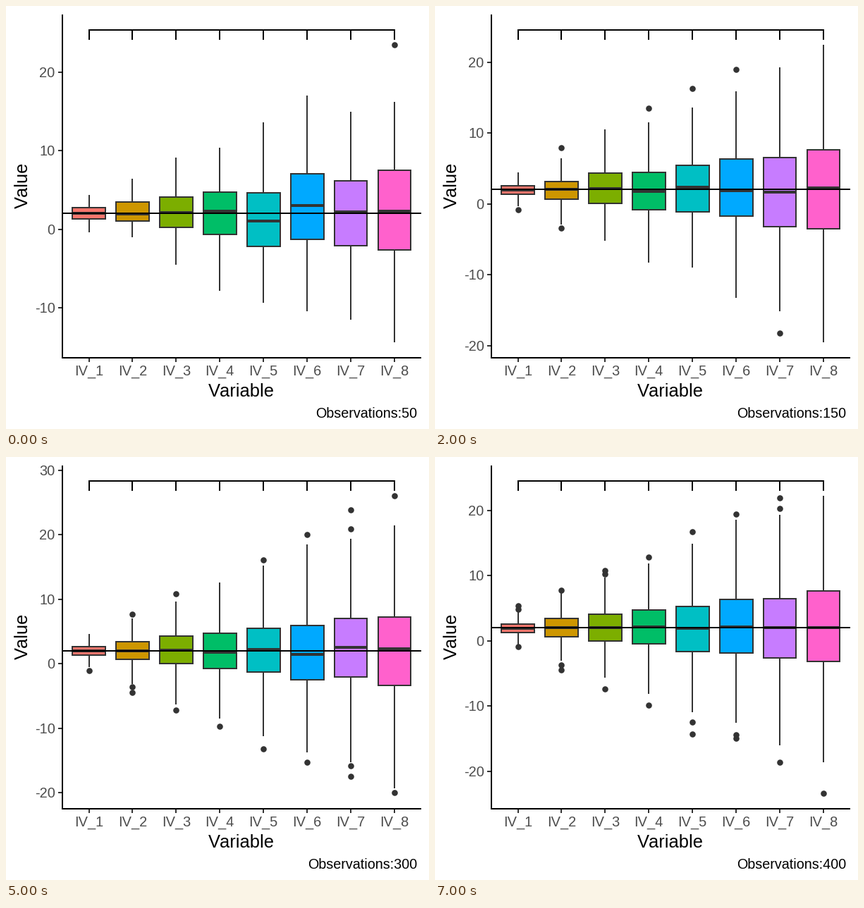
Recreate the animation shown at these times as a matplotlib script. Size 600 by 600 pixels, loop 8000 ms.

```python
import numpy as np
import matplotlib.pyplot as plt
from matplotlib.animation import FuncAnimation
from matplotlib.patches import Rectangle

plt.rcParams["font.family"] = "Liberation Sans"
plt.rcParams["text.kerning_factor"] = 6  # practically no kerning

PX = 0.72  # points per pixel at 100 dpi
LEFT, RIGHT, TOP, BOTTOM = 79.5, 588, 11, 498.5
DATA_TOP, DATA_BOTTOM = 54, 476
BRACKET_Y, BRACKET_TIP = 33.5, 47
XS = 117 + 61.93 * np.arange(8)
HALF = 23.4
MEAN = 2
INK, GREY = "#333333", "#4D4D4D"
HUES = ["#F8766D", "#CD9600", "#7CAE00", "#00BE67",
        "#00BFC4", "#00A9FF", "#C77CFF", "#FF61CC"]

# Lowest and highest value for each sample size: 50, 100, ... 400.
RANGES = [(-14.35, 23.5), (-18.39, 27), (-19.5, 22.5), (-22.7, 21.86),
          (-21.69, 34.8), (-20, 26.1), (-16.62, 25.25), (-23.3, 22.32)]
# Sample sizes with a significant pair; 3.5 is the gap between IV_3 and IV_4.
STARS = {200: 3.5, 350: 6.5}


def sample(n, low, high):
    """Normal samples with sd 1 to 8; the widest one spans low to high."""
    rng = np.random.default_rng(n)
    # Averaging sorted draws keeps the quartiles close to their expectation.
    groups = [MEAN + sd * np.sort(rng.normal(size=(4, n))).mean(axis=0)
              for sd in range(1, 9)]
    groups[-1][[0, -1]] = low, high
    return np.clip(groups, low, high)


def summary(v):
    """Whisker, Q3, median, Q1, whisker, and the outliers."""
    q1, mid, q3 = np.percentile(v, [25, 50, 75])
    reach = 1.5 * (q3 - q1)
    inside = (v >= q1 - reach) & (v <= q3 + reach)
    return np.array([v[inside].max(), q3, mid, q1, v[inside].min()]), v[~inside]


fig = plt.figure(figsize=(6, 6), dpi=100, facecolor="white")
ax = fig.add_axes([0, 0, 1, 1])


def line(x0, y0, x1, y1, color="black", width=2):
    ax.plot([x0, x1], [y0, y1], color=color, lw=width * PX,
            solid_capstyle="butt", zorder=2)


def text(x, y, s, size=20, color="black", ha="center", **kw):
    ax.text(x, y, s, size=size * PX, color=color, ha=ha, va="baseline", **kw)


def draw_box(x, stats, outliers, color):
    high, q3, mid, q1, low = stats
    ax.plot([x] * len(outliers), outliers, "o", color=INK,
            ms=8.6 * PX, mew=0, zorder=2)
    line(x, high, x, q3, INK)
    line(x, q1, x, low, INK)
    ax.add_patch(Rectangle((x - HALF, q3), 2 * HALF, q1 - q3, fc=color, ec=INK,
                           lw=2 * PX, joinstyle="miter", zorder=2))
    line(x - HALF, mid, x + HALF, mid, INK, 4)


def draw_axes(to_y, step):
    line(LEFT, TOP, LEFT, BOTTOM + 1)
    line(LEFT - 1, BOTTOM, RIGHT, BOTTOM)
    for value in range(-40, 41, step):
        y = to_y(value)
        if TOP < y < BOTTOM:
            line(LEFT - 6, y, LEFT - 1, y, INK)
            text(69, y + 7, str(value), color=GREY, ha="right")
    for i, x in enumerate(XS, 1):
        line(x, BOTTOM + 1, x, BOTTOM + 6, INK)
        text(x, 523.5, f"IV_{i}", color=GREY)
    text(333.5, 553, "Variable", 25.5)
    text(30.5, 254, "Value", 25.5, rotation=90, rotation_mode="anchor")


def draw_bracket(star):
    line(XS[0] - 1, BRACKET_Y, XS[-1] + 1, BRACKET_Y)
    for x in XS:
        line(x, BRACKET_Y, x, BRACKET_TIP)
    if star:
        text(np.interp(star, range(1, 9), XS), 30, "*", 25)


def update(i):
    n = 50 * (i + 1)
    low, high = RANGES[i]
    unit = (DATA_BOTTOM - DATA_TOP) / (high - low)

    def to_y(value):
        return DATA_TOP + (high - value) * unit

    ax.clear()
    # Whole coordinates are pixel centres.
    ax.set(xlim=(-0.5, 599.5), ylim=(599.5, -0.5))
    ax.axis("off")
    for x, values, color in zip(XS, sample(n, low, high), HUES):
        stats, outliers = summary(values)
        draw_box(x, to_y(stats), to_y(outliers), color)
    line(LEFT, to_y(MEAN), RIGHT, to_y(MEAN))
    draw_bracket(STARS.get(n))
    draw_axes(to_y, 10 if high - low < 50 else 20)
    text(582.5, 584, f"Observations:{n}", 19.8, ha="right")
    return []


anim = FuncAnimation(fig, update, frames=len(RANGES), interval=1000,
                     init_func=lambda: [], repeat=True, repeat_delay=0)
plt.show()
```
